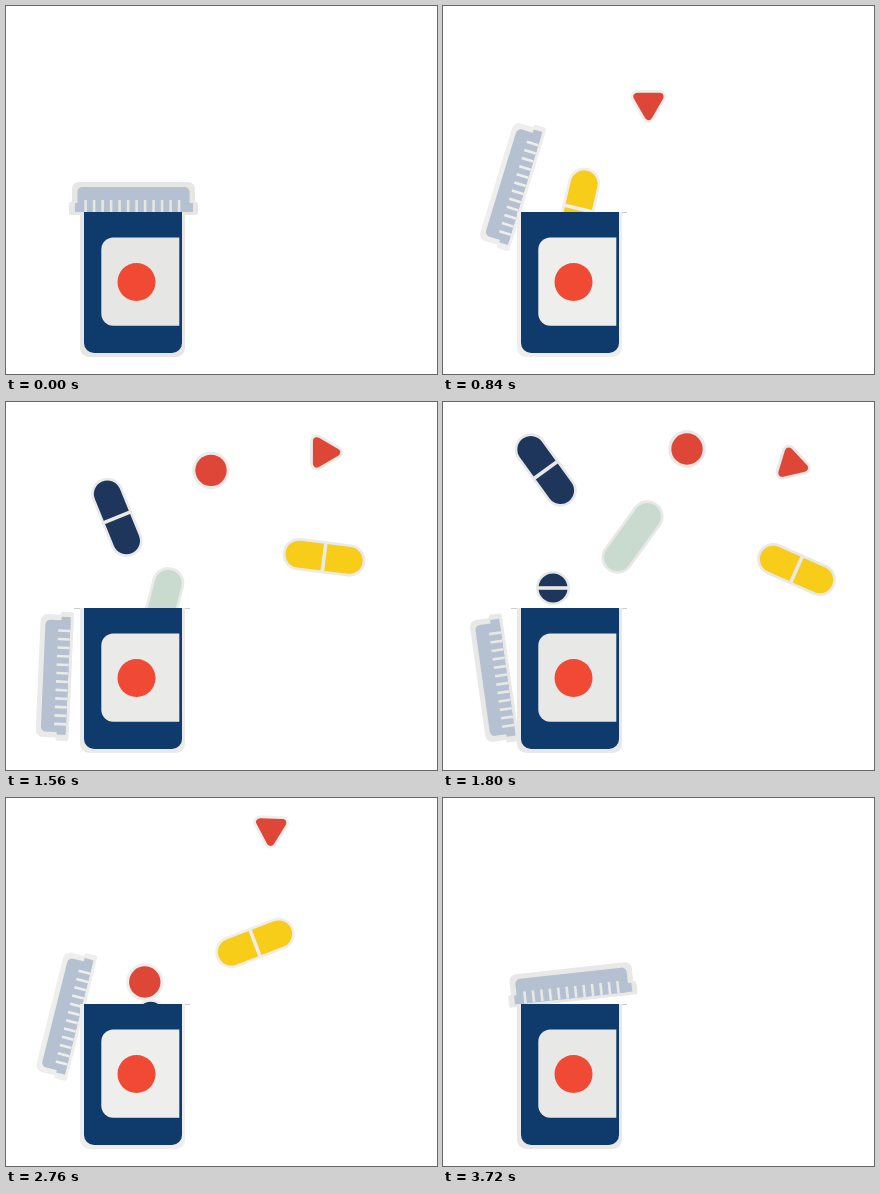
Write an HTML page with a canvas that moves like this. It is 431 px wide and 368 px high and loops after 3840 ms.

```html
<!DOCTYPE html>
<html>
<head>
<meta charset="utf-8">
<style>
  html, body { margin: 0; width: 100%; height: 100%; overflow: hidden; background: #fff; }
  canvas { display: block; }
</style>
</head>
<body>
<canvas id="stage" width="431" height="368"></canvas>
<script>
const ctx = document.getElementById('stage').getContext('2d');
const STEP = 120, STEPS = 32;
const NAVY = '#1f365c', BLUE = '#0f3b6c', RED = '#de4737', YELLOW = '#f7cd19',
      MINT = '#c9dacf', STEEL = '#b5c0d0';
let pale;

// Each item moves through a few poses [time, x, y, degrees, bowX, bowY];
// the bow bends the leg that ends in that pose.
const items = [
  [tablet, [12.6, 118, 235, 0], [15, 110, 186, 0]],
  [() => capsule(MINT), [11, 133.5, 253, -90], [15, 189.5, 135, -54]],
  [() => capsule(NAVY, true), [7, 157, 285, 99], [11, 126, 179, 77], [15, 102.7, 68, 54, -6, -20]],
  [() => capsule(YELLOW, true), [5, 128, 255, -90], [7, 135.4, 202.5, -77],
    [8.6, 249, 145, -21], [15, 353.5, 167.5, 24, 4, -4]],
  [() => disc(RED, 15.7, 3), [7, 112, 226, 0], [11, 179, 121, 0], [15, 244, 47, 0, 0, -24]],
  [triangle, [5, 140, 230, -30], [7, 205.5, 97.2, -30], [8.6, 265, 31, -28], [15, 348.7, 62, 17]],
  [lid, [0, 127.5, 192.5, 0], [7, 69, 179, -73, 20, -15], [11, 53.5, 254, -80.5, -3, 8],
    [15, 51, 277.5, -98, -4, 11]]
];

// Steps are slightly uneven: every fourth one hangs back.
const pace = s => s - 0.2 * (1 + Math.sin(s * Math.PI / 2));

function pose(keys, t) {
  let i = 1;
  while (i < keys.length - 1 && t > keys[i][0]) i++;
  const [t0, x0, y0, a0] = keys[i - 1];
  const [t1, x1, y1, a1, bowX = 0, bowY = 0] = keys[i];
  const u = Math.min(1, Math.max(0, (t - t0) / (t1 - t0)));
  const bend = 4 * u * (1 - u);
  return [x0 + (x1 - x0) * u + bowX * bend, y0 + (y1 - y0) * u + bowY * bend, a0 + (a1 - a0) * u];
}

function box(color, x, y, w, h, r = 0) {
  ctx.fillStyle = color;
  ctx.beginPath();
  ctx.roundRect(x, y, w, h, r);
  ctx.fill();
}

function capsule(color, split) {
  box(pale, -41.5, -16.2, 83, 32.4, 16.2);
  box(color, -38.8, -13.5, 77.6, 27, 13.5);
  if (split) box(pale, -1.8, -14, 3.6, 28);
}

function disc(color, r, rim) {
  box(pale, -r - rim, -r - rim, 2 * (r + rim), 2 * (r + rim), r + rim);
  box(color, -r, -r, 2 * r, 2 * r, r);
}

function tablet() {
  disc(NAVY, 14.5, 2.5);
  box(pale, -15, -1.8, 30, 3.6);
}

function triangle() {
  const R = 12.8;
  ctx.beginPath();
  for (let i = 0; i < 3; i++) {
    const a = i * 2 * Math.PI / 3;
    ctx.lineTo(R * Math.cos(a), R * Math.sin(a));
  }
  ctx.closePath();
  ctx.lineJoin = 'round';
  for (const [color, width] of [[pale, 13.5], [RED, 8]]) {
    ctx.strokeStyle = ctx.fillStyle = color;
    ctx.lineWidth = width;
    ctx.stroke();
    ctx.fill();
  }
}

function lid() {
  box(pale, -61.5, -16.5, 123, 33, 7);
  box(pale, -64.5, 3.5, 129, 13, 2);
  box(STEEL, -56, -11.5, 112, 25, [5, 5, 0, 0]);
  box(STEEL, -58.5, 4.5, 118, 9);
  for (let i = 0; i < 12; i++) box(pale, -49.2 + i * 8.5, 1.5, 2.6, 12);
}

function bottle() {
  box(pale, 74, 206, 105, 145, [0, 0, 9, 9]);
  box(BLUE, 78, 206, 98, 141, [0, 0, 10, 10]);
  box(pale, 95.3, 231.5, 78, 88.3, [12, 0, 0, 12]);
  box('#f04a35', 111.5, 257, 38, 38, 19);
}

function frame(now) {
  const n = Math.floor(now / STEP) % STEPS;
  const step = Math.min(n, STEPS - n);
  const g = Math.round(230 + 8 * Math.sin(step * Math.PI / 16));
  pale = `rgb(${g},${g},${g - 1})`;
  box('#fff', 0, 0, 431, 368);
  box('#ccc', 68, 206, 116, 1);
  for (const [draw, ...keys] of items) {
    const [x, y, deg] = pose(keys, pace(step));
    ctx.save();
    ctx.translate(x, y);
    ctx.rotate(deg * Math.PI / 180);
    draw();
    ctx.restore();
  }
  bottle();
  requestAnimationFrame(frame);
}
requestAnimationFrame(frame);
</script>
</body>
</html>
```
